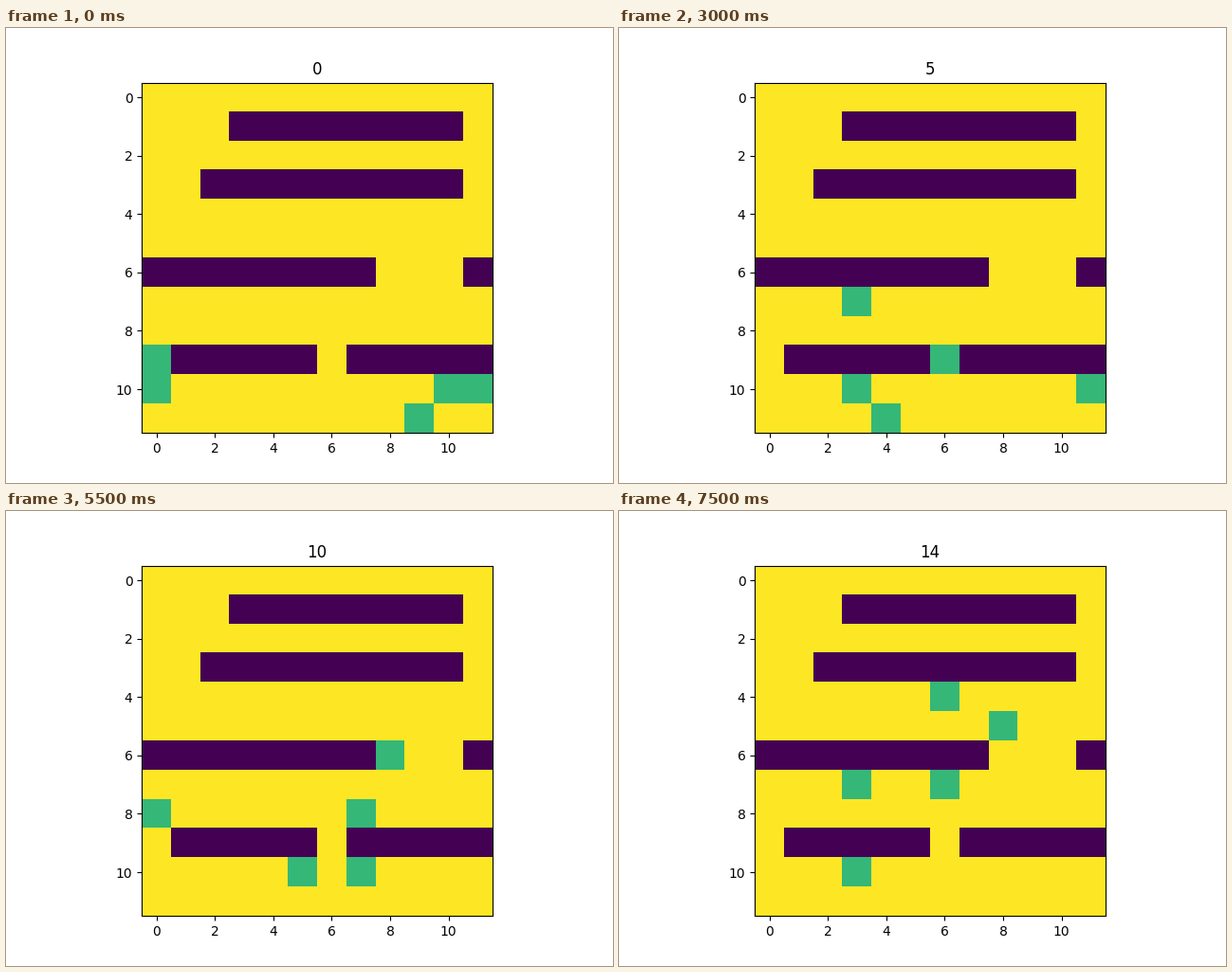
A matplotlib script for the animation above (8000 ms loop, 640 px wide and 480 px high).

```python
import matplotlib.pyplot as plt
import numpy as np
from matplotlib.animation import FuncAnimation

SIZE = 12
WALL, WALKER, FREE = 0, 2, 3
STEP_MS = 500
FRAMES = 16

# (row, first column, last column)
WALLS = [(1, 3, 10), (3, 2, 10), (6, 0, 7), (6, 11, 11), (9, 1, 5), (9, 7, 11)]

MOVES = {"U": (-1, 0), "D": (1, 0), "L": (0, -1), "R": (0, 1), ".": (0, 0)}

# Start cell and one move per step; a dot means waiting for a free way
WALKERS = [
    ((9, 0), "UURRRRRDRRURUU"),
    ((10, 0), "RRRRLLLLUUURRR"),
    ((10, 10), "LLLLUUURRUUULL"),
    ((10, 11), ".....LLL.LLUUU"),
    ((11, 9), "LLLLLLUR.RLLLR"),
]


def position(start, route, step):
    row, col = start
    for move in route[:step]:
        row += MOVES[move][0]
        col += MOVES[move][1]
    return row, col


def grid_at(step):
    grid = np.full((SIZE, SIZE), FREE)
    for row, first, last in WALLS:
        grid[row, first:last + 1] = WALL
    for start, route in WALKERS:
        grid[position(start, route, step)] = WALKER
    return grid


fig, ax = plt.subplots(figsize=(6.4, 4.8), dpi=100)
image = ax.imshow(grid_at(0), cmap="viridis", vmin=WALL, vmax=FREE,
                  interpolation="nearest")
title = ax.set_title("0")


def update(frame):
    step = max(frame - 1, 0)  # the opening state is held twice as long
    image.set_data(grid_at(step))
    title.set_text(str(step))
    return image, title


anim = FuncAnimation(fig, update, frames=FRAMES, interval=STEP_MS,
                     repeat=True, repeat_delay=0, blit=False)
plt.show()
```
